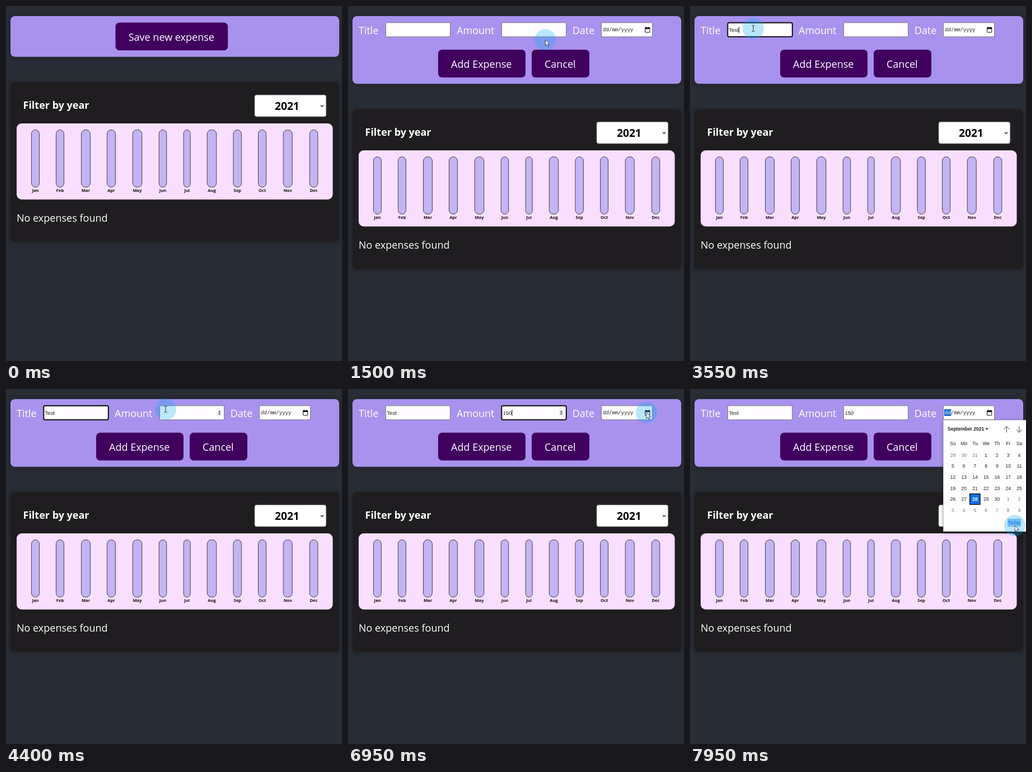
Recreate the animation shown at these times as an HTML page. Size 600 by 632 pixels, loop 8 s.

```html
<!DOCTYPE html>
<html lang="en">
<head>
<meta charset="utf-8">
<title>Expense tracker</title>
<style>
  html, body { margin: 0; width: 100%; height: 100%; overflow: hidden; background: #282c34; }
  svg { display: block; width: 600px; height: 632px; }
  text { white-space: pre; }
  .ui { font: 18px "Open Sans", "Noto Sans", sans-serif; fill: #fff; }
  .bold { font-weight: 700; }
  .month { font: 700 7.6px "Open Sans", "Noto Sans", sans-serif; fill: #111; text-anchor: middle; }
  .field { font: 9.6px "Liberation Sans", Arial, sans-serif; fill: #222; }
  .mono { font: 9.1px "Liberation Mono", "DejaVu Sans Mono", monospace; fill: #222; }
  .cal { font: 8.6px "Liberation Sans", Arial, sans-serif; fill: #222; text-anchor: middle; }
  .card { filter: drop-shadow(0 1px 4px rgba(0, 0, 0, .25)); }
</style>
</head>
<body>
<svg id="stage" viewBox="0 0 600 632" xmlns="http://www.w3.org/2000/svg"></svg>
<script>
const LOOP = 8000, STEP = 50, CLICK_SAVE = 1350, FORM_SHIFT = 48;
const FOCUS = { title: 1950, amount: 4800, date: 7150 };
const KEYS = {
  title: [[2900, "T"], [3200, "e"], [3400, "s"], [3550, "t"]],
  amount: [[5400, "1"], [5450, "5"], [5550, "0"]]
};
// Pointer path: time, x, y, easing into this point
const PATH = [
  [300, 470, -20, "out"], [1050, 375, 62, "out"], [1400, 375, 62, "out"],
  [1950, 116, 42, "both"], [2450, 113, 40, "out"], [4050, 113, 40, "out"],
  [4400, 285, 36, "out"], [5050, 289, 38, "both"], [6250, 289, 38, "out"],
  [6600, 420, 56, "in"], [6950, 533, 42, "out"], [7500, 533, 42, "out"],
  [7900, 566, 154, "in"], [7950, 580, 243, "in"]
];
const EASE = {
  in: p => p * p,
  out: p => 1 - (1 - p) ** 2,
  both: p => p * p * (3 - 2 * p)
};

const rect = (x, y, w, h, fill, r = 0, more = "") =>
  `<rect x="${x}" y="${y}" width="${w}" height="${h}" rx="${r}" fill="${fill}" ${more}/>`;
const text = (x, y, s, cls = "ui", more = "") => `<text x="${x}" y="${y}" class="${cls}" ${more}>${s}</text>`;
const path = (d, stroke, width = 1, fill = "none") =>
  `<path d="${d}" stroke="${stroke}" stroke-width="${width}" fill="${fill}"/>`;
const group = (id, body, more = "") => `<g id="${id}" ${more}>${body}</g>`;

function chart() {
  const names = "Jan Feb Mar Apr May Jun Jul Aug Sep Oct Nov Dec".split(" ");
  const centers = [52.5, 96.5, 142.5, 188, 234.5, 280, 323.2, 367.5, 413.2, 457.6, 503.2, 549.5];
  const widths = [14, 14, 16, 15, 16.5, 13.5, 12, 16.5, 14.5, 14, 16, 14.5];
  return rect(19, 209, 564.5, 135.5, "#f8dfff", 9) + names.map((name, i) =>
    rect(centers[i] - widths[i] / 2, 220.5, widths[i], 102, "#c3b4f3", Math.min(7.5, widths[i] / 2),
      'stroke="#313131" stroke-width=".9"') + text(centers[i], 331, name, "month")).join("");
}

function expenses() {
  return rect(8, 135.5, 587, 284.5, "#1f1d20", 8, 'class="card"') +
    text(30.5, 182.5, "Filter by year", "ui bold") +
    rect(444, 158.3, 127.7, 38.7, "#fff", 3.5, 'stroke="#777" stroke-width=".8"') +
    text(480, 185.3, "2021", "ui bold", 'style="font-size:19.2px;fill:#000"') +
    path("M562 176.7l2.5 2.5 2.5-2.5", "#111", 1.3) +
    chart() + text(19, 384, "No expenses found");
}

const input = (x, w) => rect(x + .5, 29.8, w - 1, 25, "#fffdff", 0, 'stroke="#767676" stroke-width=".9"');
const button = (x, y, w, label, tx, id) =>
  rect(x, y, w, 49.5, "#40005d", 7, `id="${id}"`) + text(tx, y + 32, label);

function form() {
  const ring = (id, x) => rect(x, 29.8, 115.5, 25, "none", 2.5, `id="${id}" stroke="#101010" stroke-width="2"`);
  const calendarIcon = rect(530.6, 38.8, 8.2, 8.2, "none", .6, 'stroke="#111"') +
    rect(530.2, 38.3, 9, 2.7, "#111") + path("M532.3 37v2M537.2 37v2", "#111", 1.2);
  const spinner = rect(376.5, 37.5, 9, 10, "#efeff0") +
    path("M378.8 41.4l2.2-2.6 2.2 2.6zM378.8 43.6l2.2 2.6 2.2-2.6z", "none", 0, "#444");
  return text(19, 49.6, "Title") + text(194, 49.6, "Amount") + text(400.7, 49.6, "Date") +
    input(67, 116) + input(274, 116) + input(452, 92) +
    group("spinner", spinner) + ring("titleRing", 67.3) + ring("amountRing", 274.3) +
    text(69.3, 46, "", "field", 'id="titleText"') + text(276.4, 46, "", "field", 'id="amountText"') +
    rect(0, 37, 1, 11, "#111", 0, 'id="caret"') +
    rect(454, 36, 12.3, 12, "#1668d0", 0, 'id="daySelected"') +
    text(455, 45.3, '<tspan id="day">dd</tspan>/mm/yyyy', "mono") + calendarIcon +
    button(161, 77.7, 156, "Add Expense", 184, "add") + button(328, 77.7, 103, "Cancel", 351, "cancel");
}

function popup() {
  const colX = i => 469.5 + 19.75 * i, rowY = i => 120.6 + 19.7 * i;
  const first = new Date(2021, 8, 1);
  let out = rect(452.5, 55.5, 160, 198, "#fffeff", 0,
    'stroke="#c4c4c8" style="filter:drop-shadow(0 2px 3px rgba(0,0,0,.35))"');
  out += text(460, 74.3, "September 2021", "cal", 'style="font-weight:700;font-size:8.5px;text-anchor:start"');
  out += path("M527.5 69.8h5l-2.5 3.2z", "none", 0, "#222");
  out += path("M565.3 77.5v-11M560.3 71.7l5-5 5 5M587.8 66.5v11M582.8 72.3l5 5 5-5", "#444", 1);
  "Su Mo Tu We Th Fr Sa".split(" ").forEach((d, i) => out += text(colX(i), 100, d, "cal"));
  out += rect(499.7, 186.7, 18.2, 18.8, "#1272f0", 0, 'stroke="#101010" stroke-width="1.5"');
  for (let i = 0; i < 42; i++) {
    const date = new Date(2021, 8, 1 - first.getDay() + i);
    const inMonth = date.getMonth() === 8, today = inMonth && date.getDate() === 28;
    const style = today ? "fill:#fff;font-weight:700" : inMonth ? "" : "fill:#777";
    out += text(colX(i % 7), rowY(Math.floor(i / 7)), date.getDate(), "cal", `style="${style}"`);
  }
  return out + rect(567, 231, 24, 14, "#9fc3fa", 0, 'id="todayHover"') +
    text(579, 241.2, "Today", "cal", 'style="fill:#1060d0"');
}

function pointer() {
  return `<circle r="19" fill="#00a5f5" opacity=".27"/>` +
    group("arrow", path("M0 0v10.2l2.3-2.1 1.7 3.9 1.9-.8-1.7-3.8h3.2z", "#222", .8, "#fff")) +
    group("beam", path("M-2.5-5.5q2.5 0 2.5 1.5v8q0 1.5-2.5 1.5M2.5-5.5q-2.5 0-2.5 1.5M0 4q0 1.5 2.5 1.5", "#333", 1));
}

const stage = document.getElementById("stage");
stage.innerHTML = rect(0, 0, 600, 632, "#282c34") +
  rect(8, 18, 587, 72.5, "#a892ee", 8, 'id="header" class="card"') +
  group("saver", button(195.5, 29.5, 200.7, "Save new expense", 218.7, "save")) +
  group("form", form()) + group("expenses", expenses()) +
  group("popup", popup()) + group("pointer", pointer());

const $ = id => document.getElementById(id);
const show = (id, on) => $(id).setAttribute("display", on ? "inline" : "none");
const typed = (name, t) => KEYS[name].filter(k => k[0] <= t).map(k => k[1]).join("");
const inside = (p, x, y, w, h) => p.x >= x && p.x <= x + w && p.y >= y && p.y <= y + h;

function pointerAt(t) {
  const next = PATH.findIndex(p => p[0] > t);
  if (next === 0) return { x: PATH[0][1], y: -60 };
  if (next < 0) return { x: PATH.at(-1)[1], y: PATH.at(-1)[2] };
  const [t0, x0, y0] = PATH[next - 1], [t1, x1, y1, ease] = PATH[next];
  const k = EASE[ease]((t - t0) / (t1 - t0));
  return { x: x0 + (x1 - x0) * k, y: y0 + (y1 - y0) * k };
}

function drawCaret(t, focus) {
  if (focus !== "title" && focus !== "amount") return show("caret", false);
  const resets = [FOCUS[focus], ...KEYS[focus].map(k => k[0])].filter(k => k <= t);
  show("caret", Math.floor((t - Math.max(...resets)) / 500) % 2 === 0);
  const label = $(focus + "Text");
  const width = label.textContent ? label.getComputedTextLength() : 0;
  $("caret").setAttribute("x", +label.getAttribute("x") + width);
}

function render(t) {
  const open = t >= CLICK_SAVE, p = pointerAt(t);
  const focus = Object.keys(FOCUS).filter(name => t >= FOCUS[name]).pop();
  const overAmount = inside(p, 274, 29, 116, 26);

  $("header").setAttribute("height", open ? 72.5 + FORM_SHIFT : 72.5);
  $("expenses").setAttribute("transform", `translate(0 ${open ? FORM_SHIFT : 0})`);
  show("saver", !open);
  show("form", open);
  $("save").setAttribute("fill", inside(p, 195, 29, 201, 50) ? "#510674" : "#40005d");

  show("titleRing", focus === "title");
  show("amountRing", focus === "amount");
  show("spinner", overAmount || focus === "amount");
  $("titleText").textContent = typed("title", t);
  $("amountText").textContent = typed("amount", t);
  drawCaret(t, focus);

  show("popup", focus === "date");
  show("daySelected", focus === "date");
  $("day").style.fill = focus === "date" ? "#fff" : "";
  show("todayHover", inside(p, 567, 231, 24, 14));

  const beam = open && (overAmount || inside(p, 67, 29, 116, 26));
  show("beam", beam);
  show("arrow", !beam);
  show("pointer", t >= PATH[0][0]);
  $("pointer").setAttribute("transform", `translate(${p.x} ${p.y})`);
}

let start;
function tick(now) {
  start ??= now;
  render(Math.floor((now - start) % LOOP / STEP) * STEP);
  requestAnimationFrame(tick);
}
render(0);
requestAnimationFrame(tick);
</script>
</body>
</html>
```
